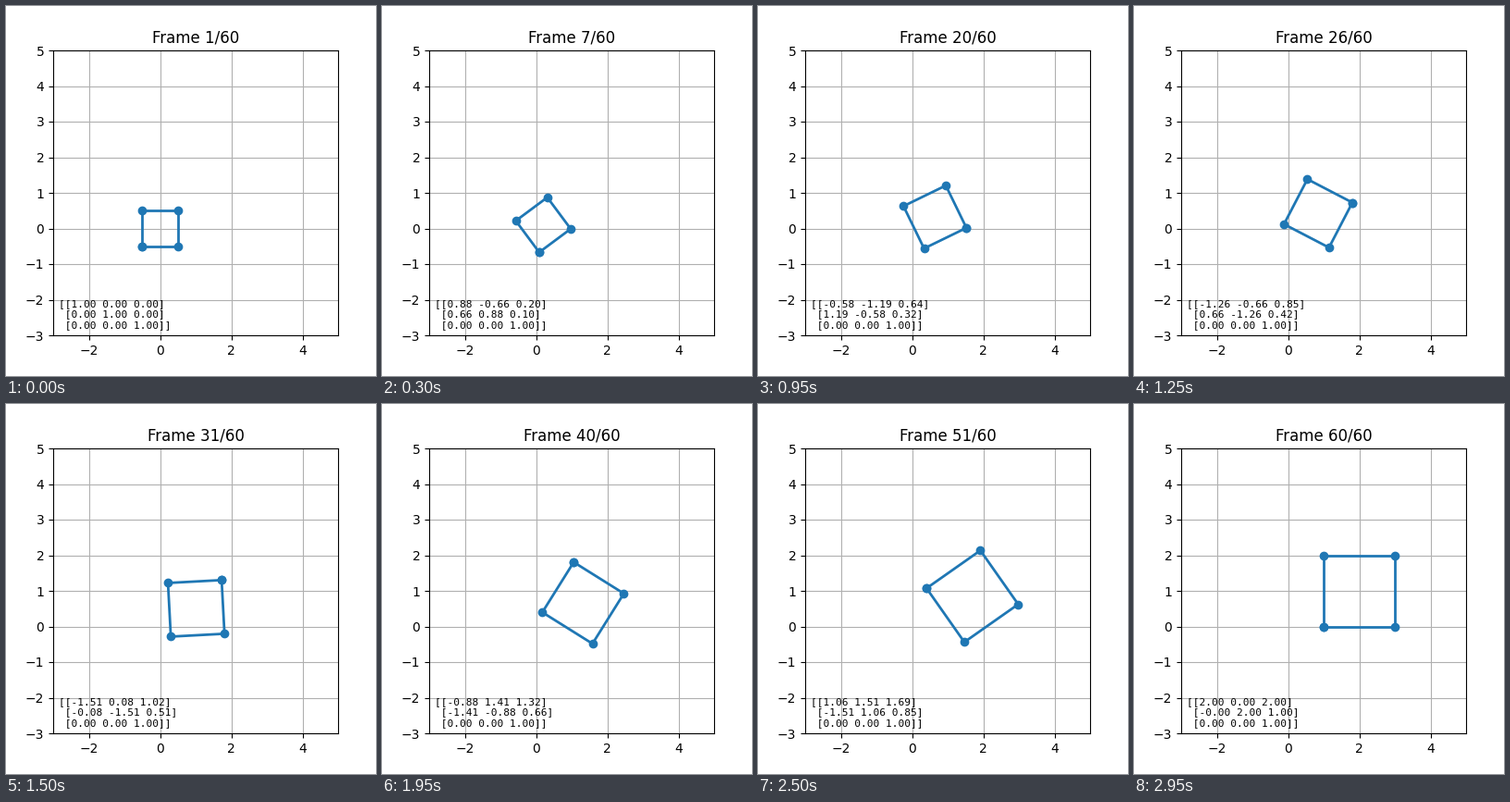
Recreate the animation shown at these times as a matplotlib script. Size 400 by 400 pixels, loop 3000 ms.

```python
import matplotlib.pyplot as plt
import numpy as np
from matplotlib.animation import FuncAnimation

FRAMES = 60
SCALE_END = 2.0
SHIFT_END = (2.0, 1.0)

# Closed unit square in homogeneous coordinates
SQUARE = np.array([
    [-0.5, 0.5, 0.5, -0.5, -0.5],
    [-0.5, -0.5, 0.5, 0.5, -0.5],
    [1.0, 1.0, 1.0, 1.0, 1.0],
])


def translation(tx, ty):
    return np.array([[1, 0, tx], [0, 1, ty], [0, 0, 1]], dtype=float)


def rotation(angle):
    c, s = np.cos(angle), np.sin(angle)
    return np.array([[c, -s, 0], [s, c, 0], [0, 0, 1]])


def scaling(k):
    return np.diag([k, k, 1.0])


def transform_at(t):
    shift = translation(SHIFT_END[0] * t, SHIFT_END[1] * t)
    return shift @ rotation(2 * np.pi * t) @ scaling(1 + (SCALE_END - 1) * t)


def matrix_text(m):
    rows = ["[" + " ".join(f"{v:.2f}" for v in row) + "]" for row in m]
    return "[" + "\n ".join(rows) + "]"


fig, ax = plt.subplots(figsize=(4, 4), dpi=100)
ax.set_xlim(-3, 5)
ax.set_ylim(-3, 5)
ax.set_aspect("equal")
ax.grid(True)

outline, = ax.plot([], [], "o-", lw=2)
label = ax.text(0.02, 0.02, "", transform=ax.transAxes, fontsize=8,
                family="DejaVu Sans Mono", va="bottom")
title = ax.set_title("")


def update(i):
    m = transform_at(i / (FRAMES - 1))
    x, y, _ = m @ SQUARE
    outline.set_data(x, y)
    label.set_text(matrix_text(m))
    title.set_text(f"Frame {i + 1}/{FRAMES}")
    return outline, label, title


anim = FuncAnimation(fig, update, frames=FRAMES, interval=50, repeat=True,
                     repeat_delay=0, blit=False)
plt.show()
```
